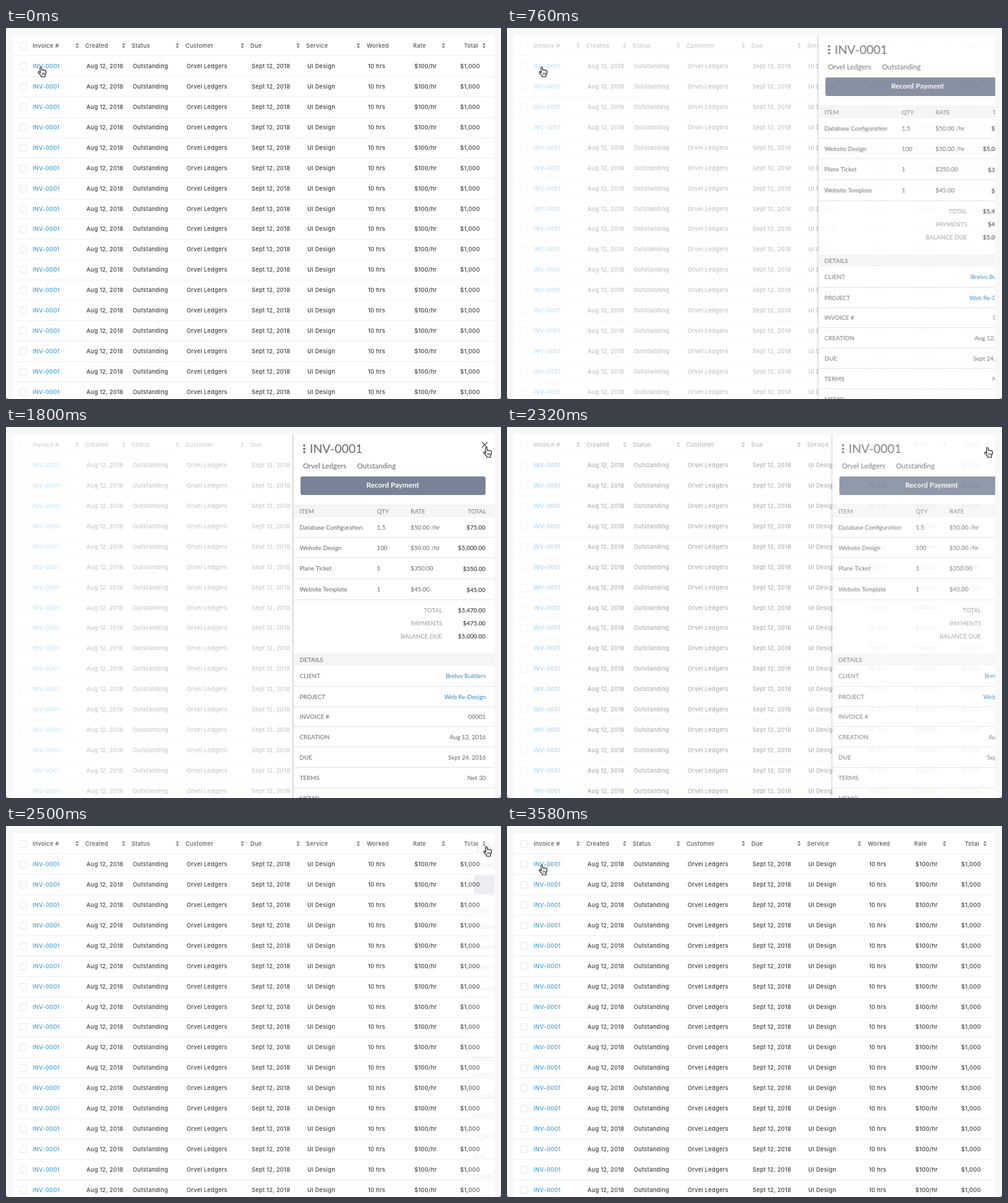
An HTML page that plays this animation: 800x600 px, repeating every 3.6 s.

```html
<!DOCTYPE html>
<html lang="en">
<head>
<meta charset="utf-8">
<title>Invoice list with sliding detail panel</title>
<style>
  html, body { margin: 0; width: 100%; height: 100%; overflow: hidden; background: #a4a6a6; }
  svg { display: block; width: 800px; height: 600px; }
  text { white-space: pre; }
  .table { font: 500 9.2px "Work Sans", Inter, sans-serif; letter-spacing: .3px; fill: #3c3c3c; animation: dim 3.6s infinite both; }
  .head { fill: #555; }
  .link { fill: #3f9bd2; }
  .rule { stroke: #efefef; }
  .box { fill: #fff; stroke: #e6e6e6; }
  .sort { fill: #777; }

  .panel { font: 9.8px Lato, sans-serif; fill: #666; animation: slide 3.6s infinite both; }
  .panel .rule { stroke: #e3e3e3; }
  .panel .link { fill: #3388c4; }
  .band { fill: #f5f5f5; }
  .title { font-size: 19.5px; }
  .sub { font-size: 11.5px; }
  .button { font-size: 11.7px; font-weight: 700; fill: #fff; }
  .label { fill: #7b7b7b; }
  .field { fill: #7f7f7f; font-weight: 600; }
  .sum { fill: #999; }
  .bold { font-weight: 700; fill: #555; }
  .end { text-anchor: end; }
  .mid { text-anchor: middle; }

  .hand { animation: point 3.6s infinite both; }

  @keyframes dim {
    0% { opacity: 1; }
    11.111% { opacity: 1; animation-timing-function: cubic-bezier(.15, .5, .3, 1); }
    26.111%, 56.111% { opacity: .28; animation-timing-function: cubic-bezier(1, 0, .6, 1); }
    71.111%, 100% { opacity: 1; }
  }
  @keyframes slide {
    0% { transform: translateX(328px); opacity: 0; }
    11.111% { transform: translateX(328px); opacity: 0; animation-timing-function: cubic-bezier(.593, 0, .299, 1); }
    26.111%, 56.111% { transform: none; opacity: 1; animation-timing-function: cubic-bezier(.934, 0, .792, 1); }
    71.111%, 100% { transform: translateX(328px); opacity: 0; }
  }
  @keyframes point {
    0% { transform: translate(51px, 62px); }
    26.111% { transform: translate(51px, 62px); animation-timing-function: ease-in-out; }
    41.111% { transform: translate(771px, 32px); }
    71.111% { transform: translate(771px, 32px); animation-timing-function: ease-in-out; }
    86.111%, 100% { transform: translate(51px, 62px); }
  }
</style>
</head>
<body>
<svg viewBox="0 0 800 600">
  <defs>
    <clipPath id="card"><rect x="11" y="12" width="778" height="588"/></clipPath>
    <linearGradient id="shade">
      <stop offset="0" stop-color="#000" stop-opacity="0"/>
      <stop offset="1" stop-color="#000" stop-opacity=".16"/>
    </linearGradient>
  </defs>
  <path d="M0 0H800V594Q800 600 794 600H6Q0 600 0 594Z" fill="#f7f8f8"/>
  <rect x="11" y="12" width="778" height="588" fill="#fff"/>
  <g class="table" id="table"></g>
  <g clip-path="url(#card)"><g class="panel" id="panel"></g></g>
  <g class="hand">
    <path d="M4.5 10.6 3.9 2.4Q3.9 1 5.1 1T6.4 2.2L7 6.2Q8 5 9.2 6.1 10.5 5.4 11.3 6.7 13.3 6.2 13.6 8.2L13.5 11.5 12 14.2V17H5.8V15.2L1.5 10.8Q.5 9.2 1.7 8.6 3 8.2 4.5 10.6Z"
      fill="#fff" stroke="#111" stroke-width="1.1" stroke-linejoin="round"/>
    <path d="M7.4 10.2V13.6M9.3 10.2V13.6M11.2 10.2V13.6" stroke="#111" stroke-width=".8"/>
  </g>
</svg>
<script>
  const text = (x, y, s, cls = '') => `<text x="${x}" y="${y}" class="${cls}">${s}</text>`;
  const rule = (x1, x2, y) => `<path class="rule" d="M${x1} ${y}H${x2}"/>`;
  const box = y => `<rect class="box" x="22.5" y="${y - 5.5}" width="11" height="11" rx="1.5"/>`;
  const sort = x => `<path class="sort" d="M${x - 2.7} 27.4h5.4l-2.7-3.2zM${x - 2.7} 29.4h5.4l-2.7 3.2z"/>`;
  const band = (y, h) => `<rect class="band" x="465" y="${y}" width="324" height="${h}"/>`;

  const client = 'Orvel Ledgers';

  // title, title x, sort arrow x, value, value x
  const columns = [
    ['Invoice #', 43, 115, 'INV-0001', 43],
    ['Created', 128, 190, 'Aug 12, 2018', 130],
    ['Status', 203, 277, 'Outstanding', 205],
    ['Customer', 290, 382, client, 292],
    ['Due', 395, 472, 'Sept 12, 2018', 397],
    ['Service', 485, 569.5, 'UI Design', 487],
    ['Worked', 583, 0, '10 hrs', 585],
    ['Rate', 658, 707, '$100/hr', 660],
    ['Total', 740, 772.5, '$1,000', 734]
  ];

  function drawTable() {
    let out = box(29) + rule(11, 789, 44.5);
    for (const [title, x, arrow] of columns) {
      out += text(x, 32, title, 'head') + (arrow ? sort(arrow) : '');
    }
    for (let i = 0; i < 17; i++) {
      const y = Math.round(62 + 32.93 * i);
      out += box(y) + rule(11, 789, y + 16.5);
      columns.forEach(([, , , value, x], c) => {
        out += text(x, y + 3, value, c ? '' : 'link');
      });
    }
    return out;
  }

  const items = [
    ['Database Configuration', '1.5', '$50.00 /hr', '$75.00', 165.5],
    ['Website Design', '100', '$50.00 /hr', '$5,000.00', 198.5],
    ['Plane Ticket', '1', '$350.00', '$350.00', 232],
    ['Website Template', '1', '$45.00', '$45.00', 266]
  ];
  const sums = [
    ['TOTAL', '$5,470.00', 299.5],
    ['PAYMENTS', '$475.00', 320.5],
    ['BALANCE DUE', '$5,000.00', 341.5]
  ];
  const details = [
    ['CLIENT', 'Brelvo Builders', 406],
    ['PROJECT', 'Web Re-Design', 439.5],
    ['INVOICE #', '00001', 471.5],
    ['CREATION', 'Aug 12, 2016', 504.5],
    ['DUE', 'Sept 24, 2016', 537.5],
    ['TERMS', 'Net 30', 570.5],
    ['MEMO', '', 603.5]
  ];

  function drawPanel() {
    let out = '<rect x="461" y="12" width="4" height="588" fill="url(#shade)"/>'
      + '<rect x="465" y="12" width="324" height="588" fill="#fff"/>'
      + [29.7, 35.2, 40.7].map(y => `<circle cx="482" cy="${y}" r="1.8"/>`).join('')
      + text(491, 41.7, 'INV-0001', 'title')
      + text(480, 67, client, 'sub') + text(567.5, 67, 'Outstanding', 'sub')
      + '<path d="M769 24.2l9 9M778 24.2l-9 9" stroke="#555" stroke-width="1.4"/>'
      + '<rect x="476" y="80" width="299" height="30" rx="3" fill="#788397"/>'
      + text(625, 97.5, 'Record Payment', 'button mid')
      + band(125, 21)
      + text(474.5, 139.5, 'ITEM', 'label') + text(599.5, 139.5, 'QTY', 'label')
      + text(654, 139.5, 'RATE', 'label') + text(776, 139.5, 'TOTAL', 'label end');
    for (const [name, qty, rate, total, y] of items) {
      out += text(474.5, y, name) + text(599.5, y, qty) + text(654, y, rate)
        + text(775, y + .5, total, 'bold end') + rule(465, 789, Math.round(y + 12.5) + .5);
    }
    for (const [name, value, y] of sums) {
      out += text(705, y, name, 'sum end') + text(775, y, value, 'bold end');
    }
    out += band(366, 20) + text(474.5, 380, 'DETAILS', 'field');
    details.forEach(([name, value, y], i) => {
      out += text(474.5, y, name, 'field') + text(775.5, y, value, i < 2 ? 'link end' : 'end')
        + rule(465, 789, Math.round(y + 12.5) + .5);
    });
    return out;
  }

  document.getElementById('table').innerHTML = drawTable();
  document.getElementById('panel').innerHTML = drawPanel();
</script>
</body>
</html>
```
